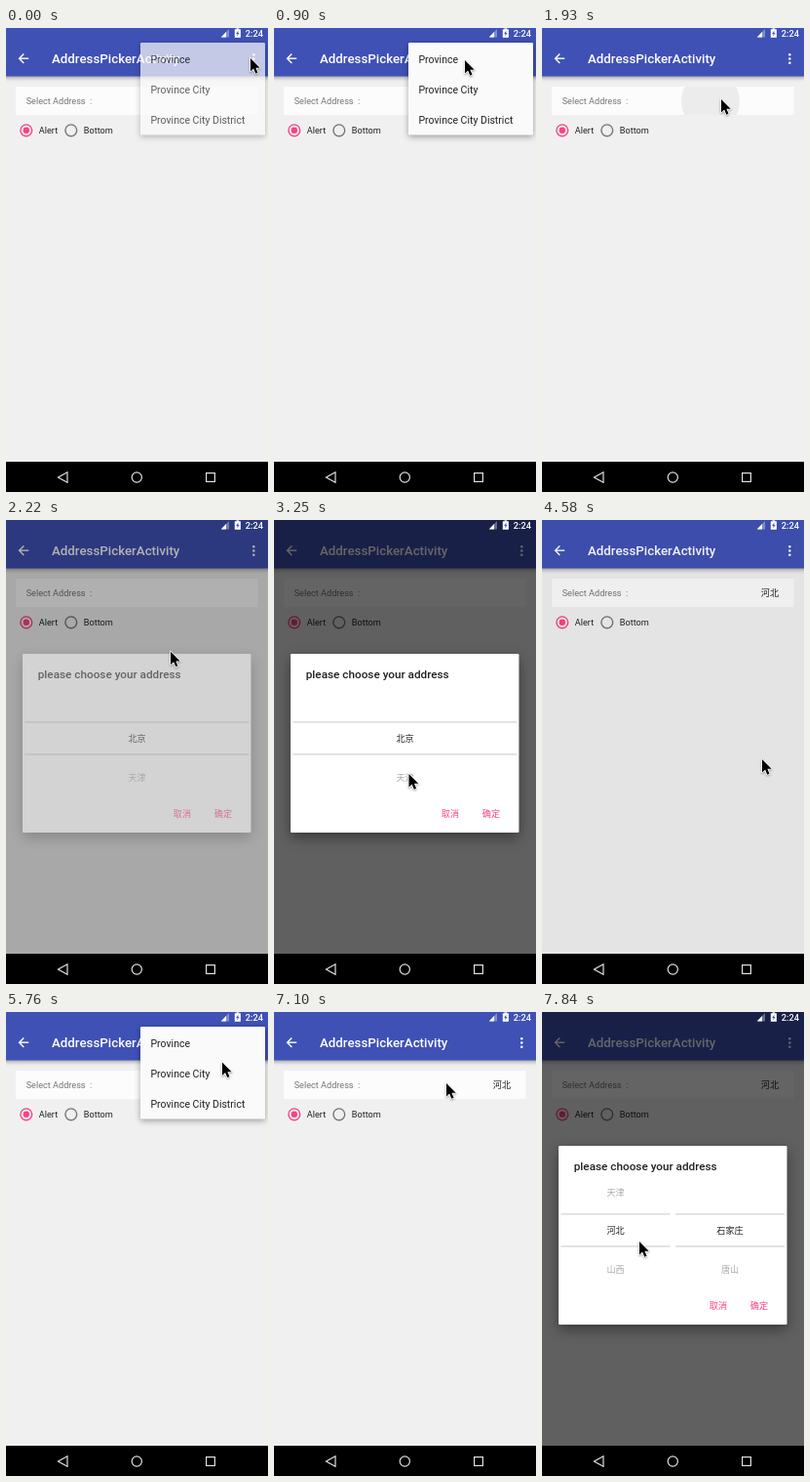
An HTML page with a canvas for the animation above (7.99 s loop, 269 by 475 pixels).

```html
<!DOCTYPE html>
<html lang="zh-CN">
<head>
<meta charset="utf-8">
<title>Address picker</title>
<style>
html, body { margin: 0; width: 100%; height: 100%; overflow: hidden; background: #efefef; }
canvas { display: block; width: 269px; height: 475px; }
</style>
</head>
<body>
<canvas id="stage"></canvas>
<script>
const W = 269, H = 475, LOOP = 7990, STEPS = 54;
const FONT = 'Roboto, "Noto Sans CJK SC", "Noto Sans CJK", sans-serif';
const PINK = '#ff4081', BLUE = '#3f51b5', INK = '#212121';
const PROVINCES = ['北京', '天津', '河北', '山西', '内蒙古'];
const CITIES = ['石家庄', '唐山', '秦皇岛'];
const MODES = ['Province', 'Province City', 'Province City District'];

// Pointer moves: glide to x, y between two steps
const MOVES = [
  { x: 196, y: 33, from: 0, to: 6 },
  { x: 184, y: 73, from: 9, to: 13 },
  { x: 138.5, y: 260, from: 14, to: 22 },
  { x: 243, y: 305, from: 22, to: 25 },
  { x: 224.5, y: 300, from: 25, to: 29 },
  { x: 226, y: 245, from: 29, to: 31 },
  { x: 252, y: 37, from: 31, to: 35 },
  { x: 200, y: 62, from: 38, to: 42 },
  { x: 177, y: 73, from: 43, to: 48 },
  { x: 100, y: 235, from: 49, to: 53 }
];

const ratio = window.devicePixelRatio || 1;
const stage = document.getElementById('stage');
const layer = document.createElement('canvas');
for (const c of [stage, layer]) {
  c.width = W * ratio;
  c.height = H * ratio;
}
const main = stage.getContext('2d'), group = layer.getContext('2d');
let ctx = main;

const clamp = v => Math.min(1, Math.max(0, v));
const ramp = (from, to, v) => clamp((v - from) / (to - from));
const smooth = p => p * p * (3 - 2 * p);
const glide = p => 1 - (1 - p) ** 3;

// 0..1 presence of something that fades in after open and is gone at close
const shown = (step, open, close, rise, fall) =>
  Math.min(clamp((step - open) / rise), clamp((close - step) / fall));

function pointerAt(step) {
  const at = { x: 251, y: 31 };
  for (const move of MOVES) {
    const p = glide(ramp(move.from, move.to, step));
    at.x += (move.x - at.x) * p;
    at.y += (move.y - at.y) * p;
  }
  return at;
}

function rect(x, y, w, h, color) {
  ctx.fillStyle = color;
  ctx.fillRect(x, y, w, h);
}

function path(points, close = true) {
  ctx.beginPath();
  points.forEach(([x, y]) => ctx.lineTo(x, y));
  if (close) ctx.closePath();
}

function fillPath(points, color) {
  path(points);
  ctx.fillStyle = color;
  ctx.fill();
}

function disc(x, y, r, color) {
  ctx.beginPath();
  ctx.arc(x, y, r, 0, Math.PI * 2);
  ctx.fillStyle = color;
  ctx.fill();
}

function ring(x, y, r, color, width) {
  ctx.beginPath();
  ctx.arc(x, y, r, 0, Math.PI * 2);
  ctx.strokeStyle = color;
  ctx.lineWidth = width;
  ctx.stroke();
}

function clipped(x, y, w, h, draw) {
  ctx.save();
  ctx.beginPath();
  ctx.rect(x, y, w, h);
  ctx.clip();
  draw();
  ctx.restore();
}

// Text centred vertically on y
function text(str, x, y, size, color, weight = 400, align = 'left') {
  ctx.font = `${weight} ${size}px ${FONT}`;
  ctx.textAlign = align;
  ctx.fillStyle = color;
  ctx.fillText(str, x, y + size * .36);
}

function card(x, y, w, h, color, blur, drop, shade) {
  ctx.save();
  ctx.shadowColor = `rgba(0,0,0,${shade})`;
  ctx.shadowBlur = blur * ratio;
  ctx.shadowOffsetY = drop * ratio;
  ctx.beginPath();
  ctx.roundRect(x, y, w, h, 1.3);
  ctx.fillStyle = color;
  ctx.fill();
  ctx.restore();
}

// Draws onto a separate layer, then blends it as one piece
function faded(alpha, draw) {
  if (alpha <= 0) return;
  ctx = group;
  ctx.setTransform(ratio, 0, 0, ratio, 0, 0);
  ctx.clearRect(0, 0, W, H);
  draw();
  ctx = main;
  ctx.globalAlpha = alpha;
  ctx.drawImage(layer, 0, 0, W, H);
  ctx.globalAlpha = 1;
}

function drawToolbar() {
  card(-20, -20, W + 40, 69.5, BLUE, 4, 1.5, .35);
  ctx.strokeStyle = '#fff';
  ctx.lineWidth = 1.4;
  path([[18.3, 26.4], [13.6, 31.2], [18.3, 36]], false);
  ctx.stroke();
  path([[13.8, 31.2], [23.2, 31.2]], false);
  ctx.stroke();
  text('AddressPickerActivity', 47, 31.7, 13.3, '#fff', 500);
  for (let i = -1; i <= 1; i++) disc(254.3, 31.5 + i * 4.3, 1.3, '#fff');
}

function drawRadio(x, label, color) {
  ring(x, 104.8, 5.9, color, 1.4);
  text(label, x + 13, 105, 9.15, INK);
}

function drawForm(step) {
  rect(10, 60, 248.5, 29, '#fcfcfc');
  const pressed = step === 13 || step === 14 || step === 49;
  if (pressed) clipped(10, 60, 248.5, 29, () => disc(173, 75, step === 14 ? 80 : 30, '#ececec'));
  text('Select Address', 20.7, 75, 9.15, '#757575');
  text(':', 86, 75, 9.15, '#757575');
  if (step >= 30) text('河北', 243, 75, 9.15, INK, 400, 'right');
  drawRadio(20.8, 'Alert', PINK);
  disc(20.8, 104.8, 3.2, PINK);
  drawRadio(66.8, 'Bottom', '#757575');
}

function drawStatus() {
  fillPath([[220.8, 9.5], [229, 9.5], [229, 1]], 'rgba(255,255,255,.35)');
  fillPath([[220.8, 9.5], [226, 9.5], [226, 4.1]], '#fff');
  rect(236.5, .3, 2.7, 1.5, '#fff');
  rect(234.8, 1.3, 6.1, 8.5, '#fff');
  fillPath([[238.5, 2.5], [236.2, 6], [237.6, 6], [237.2, 8.6], [239.6, 5], [238.2, 5]], BLUE);
  text('2:24', 245.8, 5.4, 9.3, '#fff', 500);
}

function drawNav() {
  rect(0, 444, W, 31, '#000');
  ctx.strokeStyle = '#e0e0e0';
  ctx.lineWidth = 1.2;
  path([[53.5, 460], [63, 454.8], [63, 465.2]]);
  ctx.stroke();
  ring(134.3, 460, 5.1, '#e0e0e0', 1.2);
  ctx.strokeRect(205.6, 455.6, 8.8, 8.8);
}

function drawMenu() {
  card(138, 15, 128, 94.5, '#fafafa', 6, 2, .35);
  MODES.forEach((mode, i) => text(mode, 148.5, 31.8 + i * 31.2, 10.5, INK));
}

function drawWheel(items, x, w, scroll) {
  const rows = color => items.forEach((item, i) =>
    text(item, x + w / 2, 224 + i * 39.5 - scroll, 9.15, color, 400, 'center'));
  clipped(x, 168, w, 115, () => rows('#aaa'));
  clipped(x, 207, w, 33, () => {
    rect(x, 207, w, 33, '#fff');
    rows(INK);
  });
  for (const y of [206.2, 239.2]) rect(x, y, w, 1.4, '#d8d8d8');
}

function drawDialog(step) {
  card(17, 137, 234.5, 183, '#fff', 14, 5, .4);
  text('please choose your address', 32.7, 157.4, 11.75, INK, 500);
  const twoColumns = step > 40;
  const scroll = 79 * smooth(ramp(22.5, 28, step));
  drawWheel(PROVINCES, 19.5, twoColumns ? 112 : 230, scroll);
  if (twoColumns) drawWheel(CITIES, 137, 112, 0);
  text('取消', 171.8, 301, 9.15, PINK, 500);
  text('确定', 213.8, 301, 9.15, PINK, 500);
}

function drawPointer({ x, y }) {
  ctx.save();
  ctx.translate(x, y);
  ctx.scale(.92, .92);
  path([[0, 0], [0, 14.6], [3.4, 11.5], [5.8, 17], [8.2, 16], [5.9, 10.6], [10.6, 10.6]]);
  ctx.shadowColor = 'rgba(0,0,0,.35)';
  ctx.shadowBlur = 2 * ratio;
  ctx.shadowOffsetY = ratio;
  ctx.strokeStyle = '#fff';
  ctx.lineWidth = 1.8;
  ctx.lineJoin = 'round';
  ctx.stroke();
  ctx.shadowColor = 'transparent';
  ctx.fillStyle = '#000';
  ctx.fill();
  ctx.restore();
}

function render(ms) {
  const step = Math.min(STEPS - 1, Math.floor((ms % LOOP + 12) * STEPS / LOOP));
  const menu = shown(step, -1, 8, 1.4, 1) + shown(step, 37, 44, 1.4, 1);
  const dialog = shown(step, 14, 31, 2, 2) + shown(step, 49, 60, 2, 2);
  const dim = shown(step, 14, 31.17, 2, 2) + shown(step, 49, 60, 2, 2);

  ctx.setTransform(ratio, 0, 0, ratio, 0, 0);
  rect(0, 0, W, H, '#f0f0f0');
  drawForm(step);
  drawToolbar();
  rect(0, 0, W, H, `rgba(0,0,0,${dim * .6})`);
  drawStatus();
  faded(menu, drawMenu);
  faded(dialog, () => drawDialog(step));
  drawNav();
  drawPointer(pointerAt(step));
}

const start = performance.now();
function tick() {
  render(performance.now() - start);
  requestAnimationFrame(tick);
}
tick();
</script>
</body>
</html>
```
